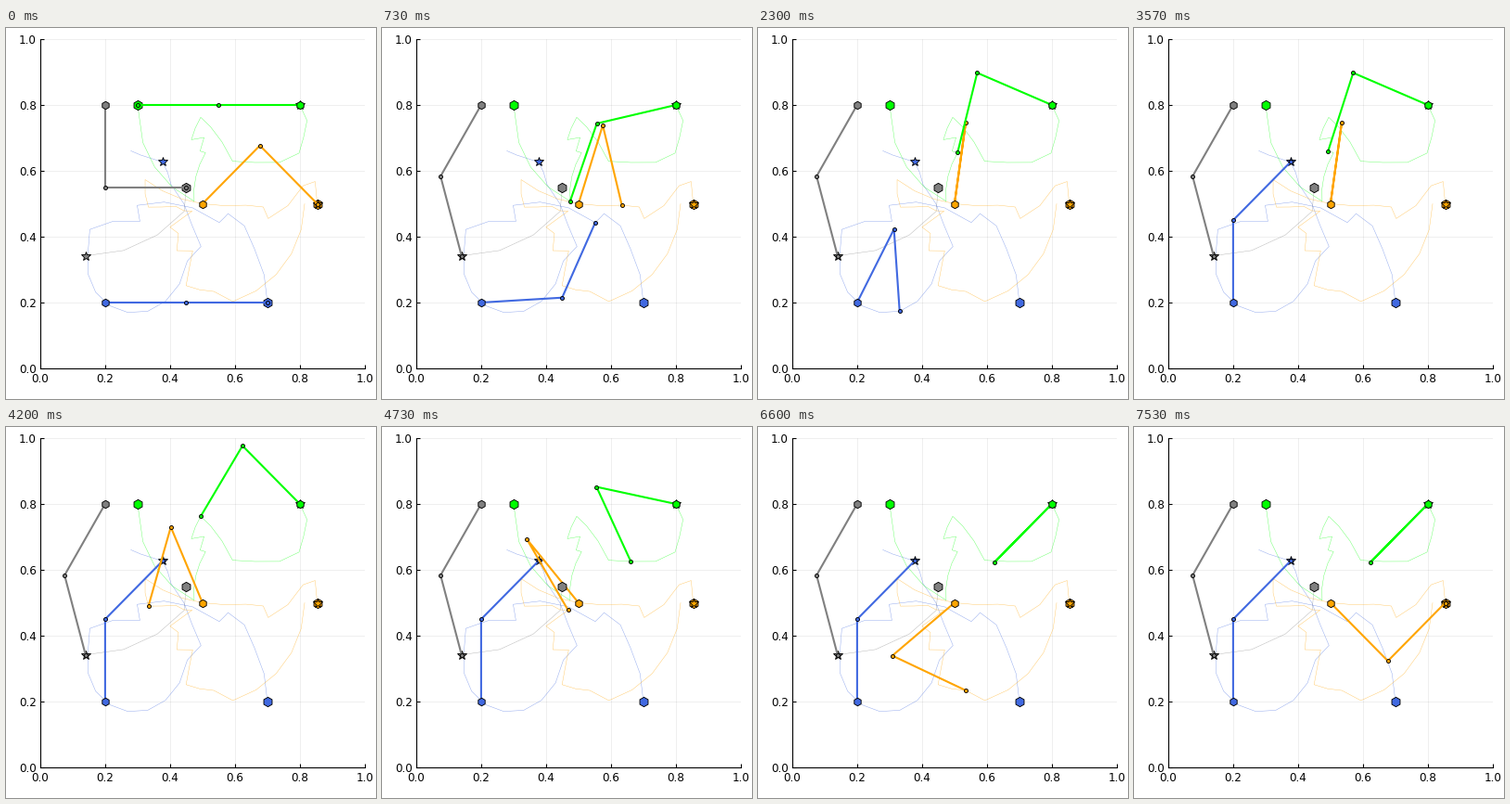
A matplotlib script for the animation above (7560 ms loop, 399 by 400 pixels).

```python
import math

import matplotlib.pyplot as plt
import numpy as np
from matplotlib.animation import FuncAnimation

W, H, DPI = 399, 400, 100
PX = 72 / DPI                     # points per pixel
X0, Y0, XS, YS = 36.9, 367, 350, 355
LINK = 0.25
STEP = 14                         # joint travel per step, degrees
TICK_MS = 7560 / 227
INTERVAL, FRAMES = 30, 252


def joint_path(keys):
    """Even steps of about STEP degrees through the key poses."""
    path = [np.array(keys[0], float)]
    for a, b in zip(keys, keys[1:]):
        a, b = np.array(a, float), np.array(b, float)
        n = max(1, round(np.hypot(*(b - a)) / STEP))
        path += [a + (b - a) * i / n for i in range(1, n + 1)]
    return path


class Arm:
    """Two-link arm; keys are (shoulder, elbow) angles in degrees.

    runs: (first tick, number of steps); the arms take turns,
    so each one steps every fourth tick.
    """

    def __init__(self, color, base, keys, runs):
        self.color, self.base = color, base
        self.path = [self.joints(*q) for q in joint_path(keys)]
        self.ticks = [t + 4 * i for t, n in runs for i in range(n)]

    def joints(self, shoulder, bend):
        x, y = self.base
        pts = [(x, y)]
        for a in (shoulder, shoulder + bend):
            x += LINK * math.cos(math.radians(a))
            y += LINK * math.sin(math.radians(a))
            pts.append((round(x, 5), round(y, 5)))
        return pts

    def pose(self, tick):
        i = sum(t <= tick for t in self.ticks)
        return self.path[min(i, len(self.path) - 1)]

    def build(self, ax, z):
        def mark(p, shape, size):
            ax.plot(*p, shape, ms=size * PX, mfc=self.color, mec="black",
                    mew=0.9 * PX, zorder=z)

        tips = dict.fromkeys(p[2] for p in self.path)
        ax.plot(*zip(*tips), color=self.color, lw=0.45 * PX, alpha=0.6,
                zorder=2)
        mark(self.path[0][2], "h", 10.3)
        mark(self.path[-1][2], "*", 10.8)
        self.rod, = ax.plot([], [], color=self.color, lw=2.1 * PX, zorder=z,
                            solid_joinstyle="round")
        self.dots, = ax.plot([], [], "o", ms=4 * PX, mfc=self.color,
                             mec="black", mew=0.9 * PX, zorder=z)
        mark(self.base, "h", 8.5)

    def update(self, tick):
        pts = self.pose(tick)
        self.rod.set_data(*zip(*pts))
        self.dots.set_data(*zip(*pts[1:]))
        return self.rod, self.dots


ARMS = [
    Arm("royalblue", (0.2, 0.2),
        [(0, 0), (7, 25), (16, 25), (14, 43), (3.4, 62.5), (20, 103),
         (9, 115), (39, 126), (38, 143), (63, 211), (82, 249), (77, 266),
         (86, 271), (95, 291), (90, 315),
         (99, 314.5), (101, 318.5), (99, 314.5), (90, 315)],
        [(1, 27), (165, 1), (173, 2), (185, 1)]),
    Arm("orange", (0.5, 0.5),
        [(45, -90), (56, -90), (61, -102), (53, -131), (65, -136),
         (72.6, -149), (82, -180),
         (90, -225), (113, -219), (105, -199), (129.5, -189),
         (139.6, -208.4), (154, -207), (170, -218), (185, -214),
         (199, -241), (220, -245), (236, -257), (309, -258), (315, -270)],
        [(2, 8), (110, 9), (166, 16)]),
    Arm("lime", (0.8, 0.8),
        [(180, 0), (187, 12.6), (193, 57.8), (157, 99),
         (157, 95), (147, 103), (152, 91), (135, 104), (138, 111),
         (147, 116), (162, 115), (168, 127), (196, 146), (198, 157),
         (211, 168), (225, 180)],
        [(3, 4), (23, 4), (107, 14)]),
    Arm("gray", (0.2, 0.8), [(-90, 90), (-89, 72), (-120, 45)], [(4, 4)]),
]

plt.rcParams["font.family"] = "DejaVu Sans"
fig = plt.figure(figsize=(W / 100, H / 100), dpi=DPI, facecolor="white")
ax = fig.add_axes([X0 / W, 1 - Y0 / H, XS / W, YS / H])
ax.set(xlim=(0, 1), ylim=(0, 1))
ax.set_axisbelow(True)
ax.grid(color="black", alpha=0.1, lw=0.6 * PX)
ax.spines[["top", "right"]].set_visible(False)
ax.spines[["left", "bottom"]].set_linewidth(1.1 * PX)
ticks = [k / 5 for k in range(6)]
labels = [f"{t:.1f}" for t in ticks]
ax.set_xticks(ticks, labels)
ax.set_yticks(ticks, labels)
ax.tick_params(direction="in", length=4 * PX, width=1.1 * PX,
               labelsize=12 * PX)
ax.tick_params(axis="x", pad=4.5 * PX)
ax.tick_params(axis="y", pad=4 * PX)

for k, arm in enumerate(ARMS):
    arm.build(ax, 3 + k)


def draw(frame):
    # sample late in the frame, so steps fall on the nearest display time
    tick = int((frame * INTERVAL + 20) / TICK_MS)
    return [a for arm in ARMS for a in arm.update(tick)]


anim = FuncAnimation(fig, draw, frames=FRAMES, interval=INTERVAL,
                     init_func=lambda: draw(0), repeat=True, repeat_delay=0)
plt.show()
```
